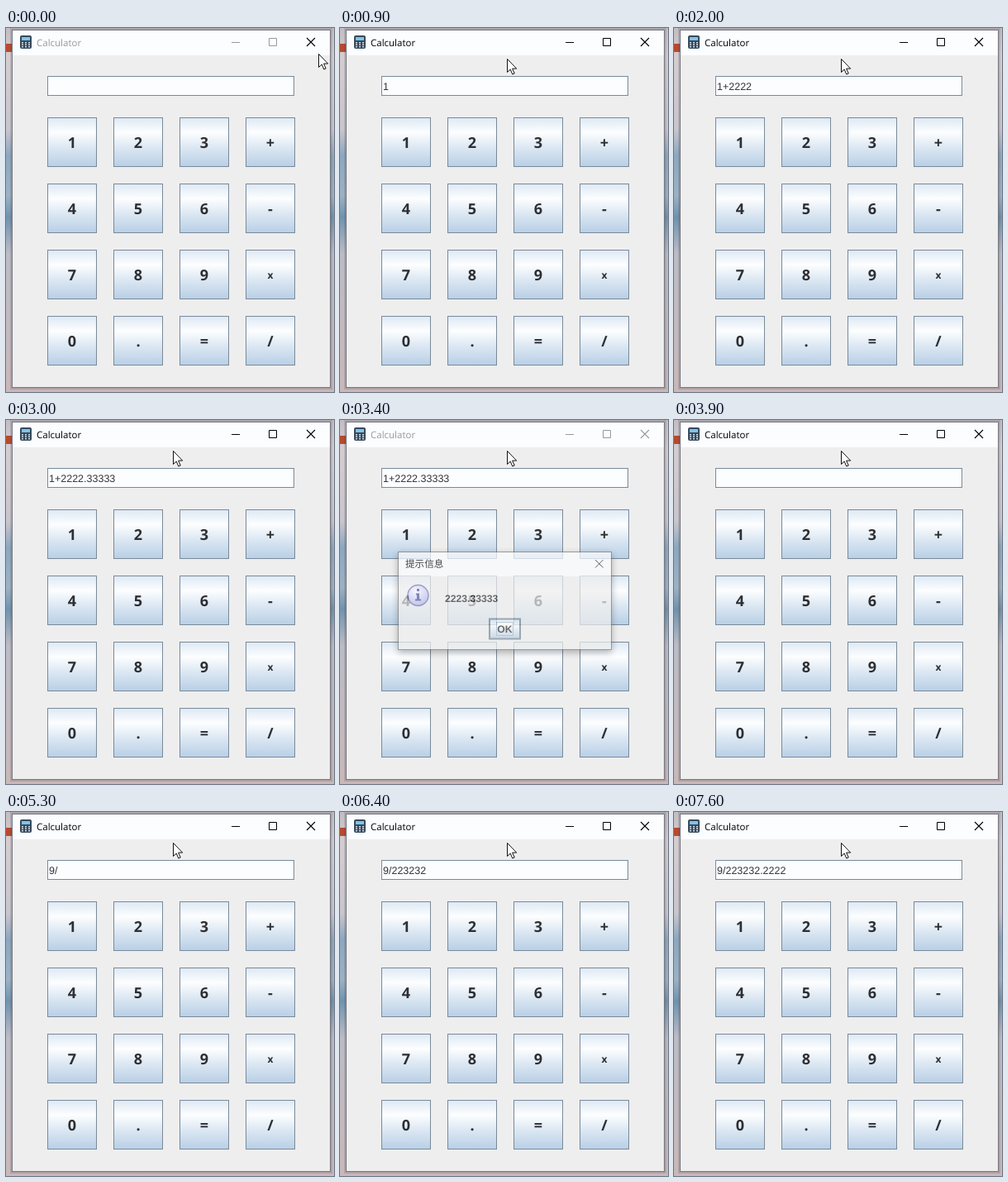
Recreate the animation shown at these times as an HTML page. Size 397 by 440 pixels, loop 8 s.

```html
<!DOCTYPE html>
<html lang="en">
<head>
<meta charset="utf-8">
<title>Calculator</title>
<style>
  html, body { margin: 0; width: 100%; height: 100%; overflow: hidden; }
  svg { display: block; }
  text { text-rendering: geometricPrecision; white-space: pre; }
  .ui { font: 11.5px "Open Sans", sans-serif; }
  .key { font: bold 18px "Open Sans", sans-serif; fill: #2d2f33; text-anchor: middle; }
  .field { font: 12.5px "Liberation Sans", sans-serif; fill: #333; }
  .label { font: bold 12.2px "Liberation Sans", sans-serif; fill: #333; }
  .cjk { font: 11.6px "Noto Sans CJK SC", "Noto Sans CJK", sans-serif; }
  .line { fill: none; stroke: #7a8a99; }
</style>
</head>
<body>
<svg width="397" height="440" viewBox="0 0 397 440">
  <defs>
    <linearGradient id="metal" x2="0" y2="1">
      <stop stop-color="#dde8f3"/>
      <stop offset=".3" stop-color="#fdfeff"/>
      <stop offset=".6" stop-color="#dde8f3"/>
      <stop offset="1" stop-color="#b8cfe5"/>
    </linearGradient>
    <linearGradient id="sky" x2="0" y2="1">
      <stop stop-color="#c3bcc2"/>
      <stop offset=".08" stop-color="#d5cdd0"/>
      <stop offset=".28" stop-color="#c9c5cc"/>
      <stop offset=".35" stop-color="#8ba8c0"/>
      <stop offset=".46" stop-color="#9cb2c4"/>
      <stop offset=".52" stop-color="#6f93ae"/>
      <stop offset=".62" stop-color="#bcbcc6"/>
      <stop offset="1" stop-color="#c9b8b8"/>
    </linearGradient>
    <radialGradient id="ball" cx=".4" cy=".3" r=".75">
      <stop stop-color="#f4f4ff"/>
      <stop offset="1" stop-color="#b4b4e4"/>
    </radialGradient>
    <filter id="blur" x="-10%" y="-15%" width="120%" height="130%">
      <feGaussianBlur stdDeviation="4"/>
    </filter>
  </defs>

  <!-- desktop -->
  <rect width="397" height="440" fill="url(#sky)"/>
  <rect y="19" width="8" height="10" fill="#b9492c"/>
  <rect x="5" y="0" width="390" height="437" fill="#445" opacity=".2"/>

  <!-- window -->
  <rect x="7.5" y="2.5" width="385" height="432" fill="#eee" stroke="#77797f"/>
  <rect x="8" y="3" width="384" height="30" fill="#fcfdff"/>
  <g>
    <rect x="17" y="9" width="14" height="16" rx="2" fill="#37495c"/>
    <rect x="19" y="11" width="10" height="4" fill="#7cc4ea"/>
    <g id="dots" fill="#d5dde4"></g>
  </g>
  <text id="title" class="ui" x="37" y="22">Calculator</text>
  <path id="boxes" fill="none" d="M273 17.5h10M318.5 12.5h9v9h-9z"/>
  <path id="close" fill="none" stroke-width="1.1" d="M364 12l10 10m0-10l-10 10"/>
  <rect x="50.5" y="58.5" width="298" height="23" fill="#fcfdff" stroke="#7a8a99"/>
  <text id="entry" class="field" x="52" y="75"></text>
  <g id="keys"></g>

  <!-- message box -->
  <g id="dialog">
    <rect x="70" y="162" width="259" height="119" fill="#000" opacity=".4" filter="url(#blur)"/>
    <rect x="70.5" y="159.5" width="258" height="118" fill="#eee" stroke="#777"/>
    <rect x="71" y="160" width="257" height="29" fill="#fcfdff"/>
    <text class="cjk" x="79" y="178">提示信息</text>
    <path d="M309 169l9.5 9.5m0-9.5l-9.5 9.5" fill="none" stroke="#222"/>
    <circle cx="94.5" cy="212" r="12.5" fill="url(#ball)" stroke="#7777b4" stroke-width="1.5"/>
    <path d="M92 209.500h4v7h2v2h-7v-2h2v-5h-1zM93 204h3v3h-3z" fill="#555599"/>
    <text class="label" x="127" y="220">2223.33333</text>
    <rect x="181" y="240.500" width="37" height="24" fill="url(#metal)" stroke="#7a8a99" stroke-width="2"/>
    <rect class="line" x="189.500" y="244.500" width="20" height="16" style="stroke:#a3b8cc"/>
    <text class="label" x="199.500" y="257" text-anchor="middle">OK</text>
  </g>

  <path id="cursor" d="M.5.5V16.500l3.700-3.500 2.600 6 2.400-1-2.600-5.900h5.100z" fill="#fff" stroke="#111"/>
</svg>
<script>
const $ = id => document.getElementById(id);
const LOOP = 8000;
const inputs = [
  { text: '1+2222.33333', end: 3900,
    at: [900, 1200, 1500, 1700, 1800, 2000, 2200, 2300, 2400, 2600, 2800, 3000] },
  { text: '9/223232.2222', end: LOOP,
    at: [5100, 5300, 5700, 5900, 6000, 6100, 6300, 6400, 7000, 7100, 7200, 7400, 7600] }
];
const fade = [.25, .7, .93, 1];
const zoom = [.97, 1, 1.015, 1.02];

$('keys').innerHTML = [...'123+456-789x0.=/'].map((key, i) => {
  const x = 50 + i % 4 * 80, y = 108 + (i >> 2) * 80;
  const small = key === 'x';
  return `<rect x="${x + .5}" y="${y + .5}" width="59" height="59" fill="url(#metal)" stroke="#7a8a99"/>
    <text class="key" x="${x + 30}" y="${y + (small ? 35 : 37)}"${small ? ' style="font-size:12px"' : ''}>${key}</text>`;
}).join('');

for (let i = 0; i < 9; i++)
  $('dots').innerHTML += `<rect x="${19 + i % 3 * 4}" y="${17 + (i / 3 | 0) * 2.5}" width="2" height="1.500"/>`;

function typed(t) {
  const input = inputs.find(p => t < p.end);
  return input.text.slice(0, input.at.filter(at => at <= t).length);
}

function draw(t) {
  const open = t >= 3300 && t < 3900;
  const active = t >= 400 && !open;
  const ink = active ? '#000' : '#999';
  $('title').setAttribute('fill', ink);
  $('boxes').setAttribute('stroke', ink);
  $('close').setAttribute('stroke', t < 100 ? '#000' : ink);
  $('entry').textContent = typed(t);

  const step = Math.min(3, Math.floor(t / 100)) / 3;
  const move = step * step * (3 - 2 * step);
  $('cursor').setAttribute('transform',
    `translate(${Math.round(378 - 176 * move)} ${Math.round(31 + 6 * move)})`);

  const k = Math.min(3, Math.floor((t - 3300) / 100));
  $('dialog').setAttribute('opacity', open ? fade[k] : 0);
  if (open) $('dialog').setAttribute('transform',
    `translate(199.5 218.5) scale(${zoom[k]}) translate(-199.5 -218.5)`);
}

const start = performance.now();
function tick() {
  draw((performance.now() - start) % LOOP);
  requestAnimationFrame(tick);
}
tick();
</script>
</body>
</html>
```
